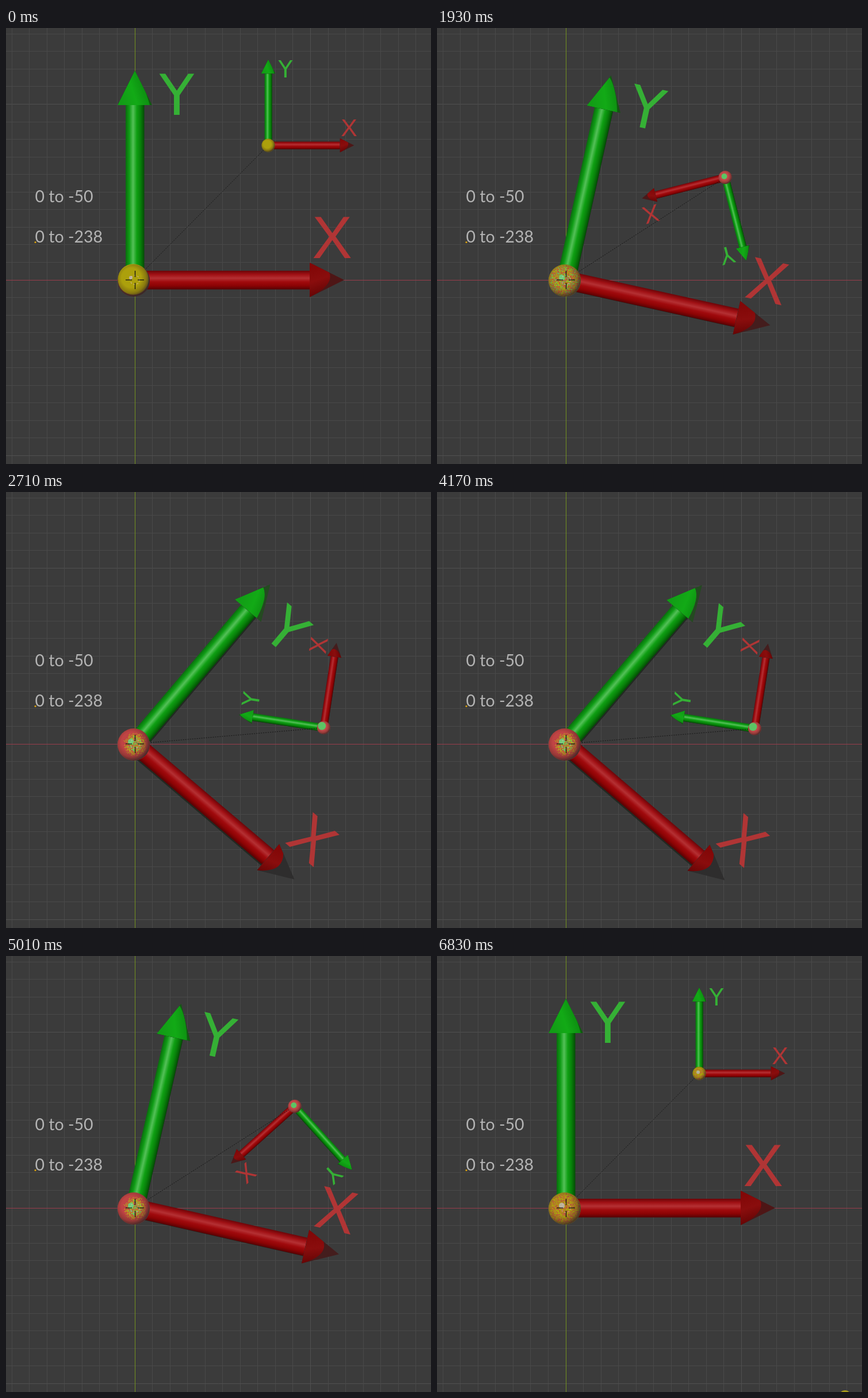
An HTML page with a canvas that plays this animation: 739 px wide and 758 px high, repeating every 6.96 s.

```html
<!DOCTYPE html>
<html lang="en">
<head>
<meta charset="utf-8">
<title>Parent and child axes</title>
<style>
html, body { margin: 0; width: 100%; height: 100%; overflow: hidden; background: #3b3b3b; }
canvas { display: block; }
</style>
</head>
<body>
<canvas id="stage" width="739" height="758"></canvas>
<script>
const ctx = document.getElementById('stage').getContext('2d');
const W = 739, H = 758, LOOP = 6960, CELL = 30.55;
const OX = 224, OY = 438;                 // parent origin
const CHILD = { x: 232, y: -234, scale: 0.41 };
const PARENT_TURN = 40.6, CHILD_TURN = 238.3;
const RAD = Math.PI / 180;

const GREEN = {
  shaft: ['#0a6c0e', '#0f9c15', '#54c058', '#0f9f13', '#078009', '#044c05'],
  cone: ['#129c16', '#12aa16', '#0c8a10'], dark: [14, 92, 14], deep: [36, 74, 33],
  text: '#35b035', font: '98.8px "DejaVu Sans", sans-serif'
};
const RED = {
  shaft: ['#6c0508', '#a01014', '#b43033', '#a00a0d', '#8c0304', '#560204'],
  cone: ['#820707', '#8a0d0d', '#650505'], dark: [78, 22, 22], deep: [46, 45, 45],
  text: '#b03535', font: '104.5px "Liberation Sans", Arial, sans-serif'
};

const clamp = v => Math.min(1, Math.max(0, v));
const smooth = v => { v = clamp(v); return v * v * (3 - 2 * v); };
const hash = (x, y) => {
  const n = Math.sin(x * 127.1 + y * 311.7) * 43758.5453;
  return n - Math.floor(n);
};
const step70 = (t, start) => start + 70 * Math.floor((t - start) / 70);

// Parent and child angles in degrees, clockwise, at time t
function pose(t) {
  if (t < 4170) {
    const q = Math.min(2700, step70(t, 1510));
    return [PARENT_TURN * smooth((q - 1443) / 1321), CHILD_TURN * smooth((q - 1443) / 816)];
  }
  const left = 5360 - step70(t, 4170), u = clamp(left / 1190);
  return [PARENT_TURN * u * (1.1 - 0.1 * u), CHILD_TURN * smooth(left / 677)];
}

function line(x1, y1, x2, y2, color) {
  ctx.strokeStyle = color;
  ctx.beginPath();
  ctx.moveTo(x1, y1);
  ctx.lineTo(x2, y2);
  ctx.stroke();
}

function gradient(x1, y1, x2, y2, colors) {
  const g = ctx.createLinearGradient(x1, y1, x2, y2);
  colors.forEach((c, i) => g.addColorStop(i / (colors.length - 1), c));
  return g;
}

function grid() {
  ctx.fillStyle = '#3b3b3b';
  ctx.fillRect(0, 0, W, H);
  ctx.lineWidth = 1;
  for (let i = -14; i < 18; i++) {
    const color = i % 10 ? '#494949' : '#505050';
    const x = Math.floor(OX + i * CELL) + 0.5, y = Math.floor(OY + i * CELL) + 0.5;
    line(x, 0, x, H, color);
    line(0, y, W, y, color);
  }
  line(0, OY + 0.5, W, OY + 0.5, '#963c4a');
  line(OX + 0.5, 0, OX + 0.5, H, '#729220');
}

// Arrow along the given direction; its shaded side always faces down-right
function arrow(deg, look, tilt, narrow) {
  const a = deg * RAD;
  ctx.save();
  ctx.rotate(a);
  if (Math.cos(a) - 0.6 * Math.sin(a) < 0) ctx.scale(1, -1);
  ctx.fillStyle = 'rgba(20,32,20,.65)';
  ctx.fillRect(20, 10, 284, 6 + 3 * tilt);
  ctx.fillStyle = gradient(0, -16, 0, 16.5, look.shaft);
  ctx.fillRect(0, -16, 304, 32.5);

  ctx.fillStyle = `rgb(${look.dark.map((v, i) => v + (look.deep[i] - v) * tilt)})`;
  ctx.beginPath();
  ctx.moveTo(304, -30);
  ctx.lineTo(364, 0);
  ctx.lineTo(304, 30);
  ctx.fill();
  ctx.clip();
  ctx.fillStyle = gradient(304, -22, 320, 26, look.cone);
  ctx.beginPath();
  ctx.moveTo(304, -30);
  if (narrow) {
    ctx.lineTo(364 - 12 * tilt, -6 * tilt);
    ctx.quadraticCurveTo(344, 15 - 3 * tilt, 304, 26 - 6 * tilt);
  } else {
    ctx.lineTo(332 - 12 * tilt, -22);
    ctx.quadraticCurveTo(356 - 14 * tilt, 4, 304, 30);
  }
  ctx.fill();
  ctx.restore();
}

function label(text, look, x, y) {
  ctx.font = look.font;
  ctx.fillStyle = look.text;
  ctx.fillText(text, x, y);
}

function rig(x, y, scale, deg, tilt) {
  ctx.save();
  ctx.translate(x, y);
  ctx.scale(scale, scale);
  arrow(deg - 90, GREEN, tilt, true);
  arrow(deg, RED, tilt, false);
  ctx.rotate(deg * RAD);
  ctx.textAlign = 'center';
  label('Y', GREEN, 73, -287);
  label('X', RED, 343, -38);
  ctx.restore();
}

function disc(x, y, r, color) {
  ctx.fillStyle = color;
  ctx.beginPath();
  ctx.arc(x, y, r, 0, 7);
  ctx.fill();
}

// Speckles from overlapping surfaces; pick(random, distance) returns a colour or nothing
function speckle(x, y, r, pick) {
  for (let j = -r; j < r; j++) for (let i = -r; i < r; i++) {
    const d = Math.hypot(i, j) / r;
    const color = d < 0.95 && pick(hash(i, j), Math.hypot(i - 2, j + 1) / r);
    if (color) {
      ctx.fillStyle = color;
      ctx.fillRect(x + i, y + j, 1, 1);
    }
  }
}

function shade(x, y, r) {
  const g = ctx.createRadialGradient(x - r * 0.15, y - r * 0.17, r * 0.6, x - r * 0.15, y - r * 0.17, r * 1.2);
  g.addColorStop(0, 'rgba(50,20,20,0)');
  g.addColorStop(0.55, 'rgba(55,30,25,.3)');
  g.addColorStop(1, 'rgba(50,38,38,.85)');
  disc(x, y, r, g);
}

function bigBall(t) {
  const x = 222, y = 439, r = 28;
  const yellow = '#b0a40c', red = '#c04444', green = '#5cc860';
  const plain = t < 1260, late = t >= 5760, mixed = t < 2000 || late;
  disc(x, y, r, plain ? '#603434' : mixed ? '#a8901c' : red);
  if (plain) disc(x - 0.7, y - 2, 26.8, '#aca00c');
  else if (late) speckle(x, y, r, n => n < 0.3 ? red : n > 0.6 && yellow);
  else if (mixed) speckle(x, y, r, n => n < 0.33 ? red : n > 0.8 ? green : n > 0.5 && yellow);
  else speckle(x, y, r, (n, d) => d < 0.4 + n * 0.5 && (n < 0.25 ? green : n < 0.75 && '#b8a020'));
  disc(x - 5, y - 5, plain ? 3 : 5, plain || late ? '#bcb49c' : '#72cc78');
  shade(x, y, r);
}

function smallBall(x, y, t, tilt) {
  const r = 11.5, moving = t >= 1260 && t < 5760;
  disc(x, y, r, moving ? '#c04848' : '#aca00c');
  if (t >= 5760) {
    speckle(Math.round(x), Math.round(y), 11, n => n < 0.25 && '#b86040');
    disc(x - 2, y - 2, 3, '#b4b098');
  }
  shade(x, y, r);
  if (moving) disc(x - 2 * tilt - 1, y - 2 * tilt - 1, 2.5 + 4.5 * Math.sqrt(tilt), '#5cc464');
}

function cursor() {
  ctx.lineWidth = 1.3;
  ctx.setLineDash([3, 3]);
  ctx.strokeStyle = 'rgba(225,190,190,.6)';
  ctx.beginPath();
  ctx.arc(OX, OY, 8, 0, 7);
  ctx.stroke();
  ctx.setLineDash([]);
  for (const s of [-1, 1]) {
    line(OX + s * 5, OY, OX + s * 16, OY, '#101010');
    line(OX + 0.5, OY + s * 5, OX + 0.5, OY + s * 16, '#101010');
  }
}

function notes() {
  ctx.font = '28.5px Lato, "Open Sans", sans-serif';
  ctx.textAlign = 'left';
  ctx.fillStyle = '#b4b4b4';
  ctx.fillText('0 to -50', 50.5, 303);
  ctx.fillText('0 to -238', 50.5, 373);
  disc(51, 372.5, 1.6, '#d8a010');
}

function draw(now) {
  const t = now % LOOP;
  const [p, c] = pose(t);
  const tilt = p / PARENT_TURN, cos = Math.cos(p * RAD), sin = Math.sin(p * RAD);
  const cx = OX + CHILD.x * cos - CHILD.y * sin;
  const cy = OY + CHILD.x * sin + CHILD.y * cos;

  grid();
  notes();
  rig(cx, cy, CHILD.scale, p + c, tilt * 0.3);
  rig(OX, OY, 1, p, tilt);
  ctx.lineWidth = 1;
  ctx.setLineDash([2, 2]);
  line(OX, OY, cx, cy, '#161616');
  ctx.setLineDash([]);
  smallBall(cx, cy, t, tilt);
  bigBall(t);
  cursor();
  if (t >= 6830) disc(709.5, 766, 11, '#a89c1c');
}

const start = performance.now();
(function tick() {
  draw(performance.now() - start);
  requestAnimationFrame(tick);
})();
</script>
</body>
</html>
```
